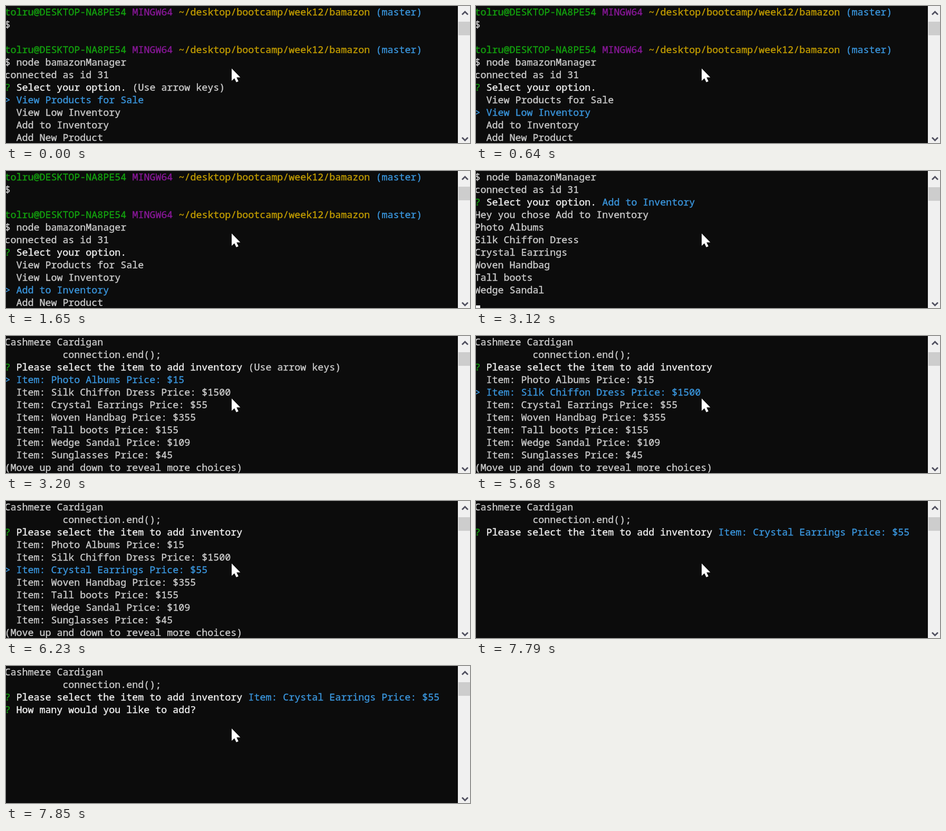
Write an HTML page that moves like this. It is 880 px wide and 262 px high and loops after 8000 ms.

```html
<!DOCTYPE html>
<html lang="en">
<head>
<meta charset="utf-8">
<title>Terminal inventory manager</title>
<style>
  html, body { margin: 0; width: 100%; height: 100%; overflow: hidden; background: #0c0c0c; }
  svg { display: block; width: 100%; height: 100%; }
  text { font: 18.333px "Noto Sans Mono", "DejaVu Sans Mono", monospace; white-space: pre; stroke-width: .4; }
  .chevron { fill: none; stroke: #505060; stroke-width: 2.8; }
</style>
</head>
<body>
<svg viewBox="0 0 880 262">
  <rect width="880" height="262" fill="#0c0c0c"/>
  <g id="screens"></g>
  <rect x="857" width="23" height="262" fill="#f0f0f0"/>
  <rect id="thumb" x="858" y="30" width="22" height="26" fill="#cdcdcd"/>
  <path class="chevron" d="M865 16.5l5.5-5.5 5.5 5.5M865 251.5l5.5 5.5 5.5-5.5"/>
  <path d="M428 119.5V143l5.2-4.8 3.6 7.6 4-1.9-3.6-7.4h7.2z" fill="#fff"/>
</svg>
<script>
const NS = "http://www.w3.org/2000/svg";
const LOOP = 8000, CELL = 11, ROW = 24, LEFT = -2.6, BASELINE = 18;
const GRAY = "#cccccc", WHITE = "#f2f2f2", GREEN = "#13a10e",
      PURPLE = "#881798", YELLOW = "#c19c00", CYAN = "#3a96dd";

// A line is a list of [text, color] runs.
const plain = text => [[text, GRAY]];
const question = (text, tail = "", color = GRAY) =>
  [["? ", GREEN], [text + " ", WHITE], [tail, color]];
const choices = (items, selected) => items.map((item, i) =>
  i === selected ? [["> " + item, CYAN]] : plain("  " + item));

const HINT = "(Use arrow keys)";
const shell = [
  ["tolru@DESKTOP-NA8PE54 ", GREEN], ["MINGW64 ", PURPLE],
  ["~/desktop/bootcamp/week12/bamazon ", YELLOW], ["(master)", CYAN]
];
const launch = [plain("$ node bamazonManager"), plain("connected as id 31")];
const options = ["View Products for Sale", "View Low Inventory", "Add to Inventory", "Add New Product"];
const stock = [
  ["Photo Albums", 15], ["Silk Chiffon Dress", 1500], ["Crystal Earrings", 55],
  ["Woven Handbag", 355], ["Tall boots", 155], ["Wedge Sandal", 109], ["Sunglasses", 45]
];
const items = stock.map(([name, price]) => `Item: ${name} Price: $${price}`);
const listed = stock.slice(0, 6).map(([name]) => plain(name));
const ended = [plain("Cashmere Cardigan"), plain(" ".repeat(10) + "connection.end();")];

const menu = (selected, hint) => [
  shell, plain("$"), [], shell, ...launch,
  question("Select your option.", hint), ...choices(options, selected)
];
const picker = (selected, hint) => [
  ...ended, question("Please select the item to add inventory", hint),
  ...choices(items, selected), plain("(Move up and down to reveal more choices)")
];
const chosen = [
  ...launch, question("Select your option.", options[2], CYAN),
  plain("Hey you chose " + options[2]), ...listed
];
const answered = [...ended, question("Please select the item to add inventory", items[2], CYAN)];

const steps = [
  { at: 0, lines: menu(0, HINT) },
  { at: 640, lines: menu(1) },
  { at: 1650, lines: menu(2) },
  { at: 3120, lines: chosen, caret: 10 },
  { at: 3200, lines: picker(0, HINT) },
  { at: 5680, lines: picker(1) },
  { at: 6230, lines: picker(2) },
  { at: 7790, lines: answered },
  { at: 7850, lines: [...answered, question("How many would you like to add?")] }
];

function add(parent, tag, attrs, text = "") {
  const node = document.createElementNS(NS, tag);
  for (const key in attrs) node.setAttribute(key, attrs[key]);
  node.textContent = text;
  return parent.appendChild(node);
}

const root = document.getElementById("screens");
const thumb = document.getElementById("thumb");

const screens = steps.map(({ lines, caret }) => {
  const group = add(root, "g", { visibility: "hidden" });
  lines.forEach((line, row) => {
    let column = 0;
    for (const [text, color] of line) {
      const x = LEFT + column * CELL, y = row * ROW + BASELINE;
      if (text) add(group, "text", { x, y, fill: color, stroke: color }, text);
      column += text.length;
    }
  });
  if (caret) add(group, "rect", { x: -3, y: caret * ROW + 17, width: CELL, height: 5, fill: WHITE });
  return group;
});

function draw() {
  const time = performance.now() % LOOP;
  const current = steps.findLastIndex(step => step.at <= time);
  screens.forEach((screen, i) =>
    screen.setAttribute("visibility", i === current ? "visible" : "hidden"));
  thumb.setAttribute("y", time < 3120 ? 30 : 31);
  requestAnimationFrame(draw);
}
draw();
</script>
</body>
</html>
```
